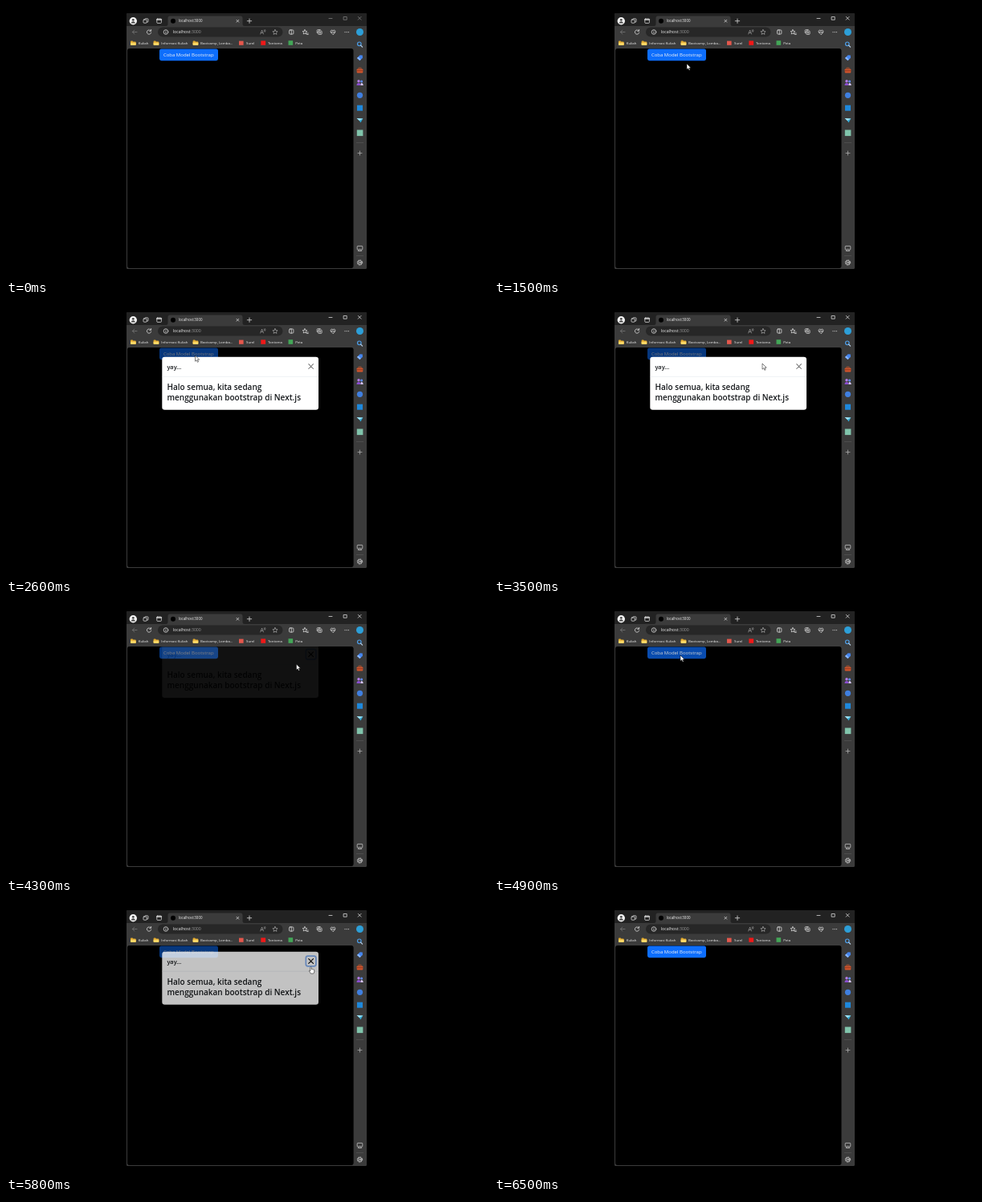
Animation of 600 by 338 pixels, one loop 6.6 s. Source, as an HTML page:

```html
<!DOCTYPE html>
<html lang="id">
<head>
<meta charset="utf-8">
<title>Coba Model Bootstrap</title>
<style>
  html, body { margin: 0; width: 100%; height: 100%; overflow: hidden; background: #000; }
  svg { display: block; width: 100vw; height: 100vh; }
  text { font-family: "Open Sans", "Noto Sans", sans-serif; fill: #f2f2f2; white-space: pre; }
  .line { fill: none; stroke: #d6d6d6; stroke-width: .8; stroke-linecap: round; stroke-linejoin: round; }
  .small { font-size: 4.35px; }
  .dim { stroke: #777; }
  .soft { stroke: #aaa; }
  #modal text { fill: #15181b; font-weight: 600; }
</style>
</head>
<body>
<svg viewBox="0 0 600 338">
  <defs>
    <clipPath id="pageClip"><rect x="151" y="53" width="281.5" height="274" rx="3"/></clipPath>
    <clipPath id="winClip"><rect x="150" y="9" width="299" height="319"/></clipPath>
    <g id="folder">
      <path d="M0 1q0-.9 .9-.9h1.6l1 1h2.4q.8 0 .8 .8v3q0 .8-.8 .8H.9q-.9 0-.9-.9z" fill="#e0a92e"/>
      <path d="M0 2.4h6.7v2.5q0 .8-.8 .8H.9q-.9 0-.9-.9z" fill="#ffd766"/>
    </g>
  </defs>
  <rect width="600" height="338"/>

  <!-- window frame -->
  <rect x="150" y="9" width="299" height="319" rx="1.5" fill="#3b3b3b"/>
  <path d="M150 25V10.5q0-1.5 1.5-1.5h296q1.5 0 1.5 1.5V25z" fill="#222"/>
  <path d="M199 25q2.5 0 2.5-2.5V15q0-2.5 2.5-2.5h88q2.5 0 2.5 2.5v7.500q0 2.500 2.500 2.500z" fill="#3b3b3b"/>

  <!-- title bar -->
  <circle cx="158.300" cy="18.700" r="4.700" fill="#f4f4f4"/>
  <circle cx="158.300" cy="17.300" r="1.400" fill="#444"/>
  <path d="M155.700 21.500q.3-2.300 2.600-2.300t2.600 2.300z" fill="#444"/>
  <g class="line">
    <rect x="171" y="17" width="4.200" height="4.200" rx=".8"/>
    <path d="M172.700 17v-.4q0-.8 .8-.8h2.700q.8 0 .8 .8v2.700q0 .8-.8 .8h-.8"/>
    <rect x="187.800" y="16" width="5.600" height="5.400" rx=".8"/>
    <path d="M187.800 17h5.600" stroke-width="1.600"/>
    <path d="M287 17.300l2.800 2.800m0-2.800l-2.800 2.800M303 16v5.400m-2.700-2.700h5.400"/>
  </g>
  <circle cx="208" cy="18.700" r="3" fill="#000"/>
  <text x="214.800" y="20.300" font-size="4.400">localhost:3000</text>
  <g id="controls" class="line" stroke-linecap="butt">
    <path d="M402 15.500h4"/>
    <rect x="420.500" y="13.500" width="3.700" height="3.700"/>
    <path d="M438.300 13.400l3.800 3.800m0-3.800l-3.800 3.800"/>
  </g>

  <!-- toolbar -->
  <rect x="189" y="26.500" width="155.500" height="12" rx="6" fill="#272727"/>
  <path class="line dim" d="M163 32.500h-5.600m2.400-2.400l-2.400 2.400l2.400 2.400"/>
  <g class="line">
    <path d="M180.300 31a2.700 2.700 0 1 0 .4 2.300M180.600 29.400v1.900h-1.900"/>
    <circle cx="199" cy="32.500" r="2.800"/>
    <path d="M199 32.300v1.600M199 31v.05"/>
    <rect x="352.500" y="30" width="5.400" height="5" rx=".9"/>
    <path d="M355.200 29.500v6"/>
    <path d="M372 29.600l.8 1.800l2 .2l-1.500 1.400l.4 2l-1.700-1l-1.800 1l.4-2l-1.500-1.400l2-.2zM374.600 34h1.600m-1.600 1.500h1.600"/>
    <rect x="388.500" y="31" width="4.600" height="4.400" rx=".9"/>
    <path d="M387.200 33.600v-3q0-1 1-1h3M390.800 32.200v2m-1-1h2"/>
    <path d="M407 35.500l-2.500-2.500q-1-1.500 .2-2.600q1.300-.9 2.300 .4q1-1.300 2.300-.4q1.200 1.100 .2 2.600zM404.500 32.800h1.600l.8-1l.8 1.600l.5-.6h1.400"/>
    <path d="M422 32.600h.05m2.150 0h.05m2.150 0h.05" stroke-width="1.100"/>
  </g>
  <g class="line soft">
    <path d="M335 29.500l.95 2l2.150 .25l-1.600 1.500l.45 2.150l-1.950-1.100l-1.950 1.100l.45-2.150l-1.600-1.500l2.150-.25z" stroke-width=".7"/>
    <path d="M316.700 35l1.900-5l1.900 5m-3.200-1.600h2.600M321.300 30q.9 .8 0 1.700M322.400 29.400q1.500 1.400 0 3" stroke-width=".6"/>
  </g>
  <text x="207.800" y="34.400" font-size="5.200">localhost<tspan fill="#9a9a9a">:3000</tspan></text>
  <circle cx="440.500" cy="32.500" r="4.500" fill="#2d9fd8"/>

  <!-- bookmarks -->
  <use href="#folder" x="155" y="43.300"/>
  <use href="#folder" x="183.600" y="43.300"/>
  <use href="#folder" x="232.600" y="43.300"/>
  <rect x="290" y="43.600" width="5.600" height="5.200" fill="#e4574c"/>
  <rect x="317.300" y="43.400" width="5.800" height="5.400" fill="#f01818"/>
  <rect x="351.500" y="43.200" width="5.600" height="5.600" fill="#43a657"/>
  <g id="bookmarks"></g>

  <!-- sidebar -->
  <g>
    <circle cx="439.800" cy="47.300" r="2.300" fill="none" stroke="#4d9de6" stroke-width="1.200"/>
    <path d="M441.600 49.200l2 2" stroke="#bcd6ee" stroke-width="1.200" stroke-linecap="round"/>
    <path d="M437 65l3.600-3.700l3.200 .2l.2 3.200l-3.600 3.300z" fill="#4586ef"/>
    <path d="M437 65l1.500-1.500l3.300 3.200l-1.400 1.300z" fill="#8dbaff"/>
    <path d="M438.900 78.500v-1.300h3.200v1.300" fill="none" stroke="#c0562b" stroke-width=".8"/>
    <rect x="436.700" y="78.400" width="7.600" height="5" rx=".9" fill="#d4552b"/>
    <path d="M436.700 80.800h7.600" stroke="#7d3320" stroke-width=".9"/>
    <circle cx="439" cy="93.800" r="1.700" fill="#b47bea"/>
    <circle cx="442.600" cy="94" r="1.500" fill="#5f8df2"/>
    <path d="M436.500 99q0-3 2.500-3t2.500 3z" fill="#8b4fd1"/>
    <path d="M441.500 99q-.2-3 1.300-3t2 3z" fill="#d9c9f4"/>
    <circle cx="440.500" cy="111.300" r="3.600" fill="#3f7fe0"/>
    <rect x="437" y="123.700" width="7" height="7" fill="#1e88dc"/>
    <path d="M436.600 139.900l7.800 .5l-3 5.200l-1.600-2.600z" fill="#32a9d6"/>
    <path d="M436.600 139.900l7.800 .5l-4.600 2.600z" fill="#a5e4f2"/>
    <rect x="436.800" y="154.500" width="7.600" height="7.600" fill="#80c4ab"/>
    <path d="M436 170.500h9M436 311.500h9" stroke="#595959" stroke-width=".6"/>
    <g class="line">
      <path d="M440.500 181v5m-2.500-2.500h5" stroke="#aaa"/>
      <path d="M439 304h-1q-.8 0-.8-.8v-3q0-.8 .8-.8h5q.8 0 .8 .8v3q0 .8-.8 .8h-1M438.600 305.200l1.900-2.300l1.900 2.300z" stroke-width=".7"/>
      <circle cx="440.500" cy="320" r="2.600"/>
      <circle cx="440.500" cy="320" r="3.200" stroke-dasharray="1.250 1.263" stroke-linecap="butt"/>
      <circle cx="440.500" cy="320" r=".9" stroke-width=".7"/>
    </g>
  </g>

  <!-- page -->
  <rect x="151" y="53" width="281.500" height="274" rx="3"/>
  <g clip-path="url(#pageClip)">
    <rect id="button" x="191" y="53.400" width="73" height="14.800" rx="2.400"/>
    <text x="195.900" y="63.200" font-size="6" fill="#fff">Coba Model Bootstrap</text>
    <rect id="backdrop" x="151" y="53" width="282" height="274" opacity="0"/>
    <g id="modal" opacity="0">
      <rect x="194.300" y="64.800" width="194.700" height="66" rx="3.300" fill="#fff"/>
      <path d="M194.300 89.300h194.700" stroke="#dee2e6" stroke-width=".5"/>
      <text x="200.400" y="79.600" font-size="7.400">yay...</text>
      <rect id="ring" x="373.300" y="70.300" width="12.600" height="12.600" rx="2.600" fill="none" stroke="#86b2f5" stroke-width="1.700"/>
      <path id="cross" d="M376.700 73.700l5.800 5.800m0-5.800l-5.800 5.800" stroke="#000" stroke-width="1.050" stroke-linecap="round"/>
      <text x="200.500" y="106.200" font-size="10">Halo semua, kita sedang</text>
      <text x="200.500" y="118.900" font-size="10">menggunakan bootstrap di Next.js</text>
    </g>
  </g>

  <g clip-path="url(#winClip)">
    <g id="cursor" fill="#fff" stroke="#000" stroke-width=".5" stroke-linejoin="round">
      <path id="arrow" d="M0 0v7.200l1.700-1.500l1.200 2.600l1.200-.6l-1.200-2.500h2.300z"/>
      <path id="hand" d="M-.7 .6q.7-1.200 1.400 0v2.600q.7-.5 1.300 .1q.7-.4 1.200 .2q.8-.2 1 .6v2.300q-.2 1.300-.9 2.100h-3.400q-.9-1.700-2.300-3.200q.3-1.100 1.700 .2z"/>
    </g>
  </g>
</svg>
<script>
const LOOP = 6600, STEP = 100;
const FADE = 150, SLIDE = 300, RISE = 21.4;
const FOCUS_AT = 900;
const visits = [
  { open: 1980, close: 4160 },
  { open: 4860, close: 5764 }
];
// time, x, y of the pointer tip
const path = [
  [1000, 302, 300], [1300, 246, 92], [1400, 241, 74], [1500, 240, 72],
  [1700, 239, 71], [1900, 235.5, 63], [3200, 235.5, 63], [3500, 334, 73],
  [3700, 376, 75], [3900, 379.5, 76.5], [4250, 379.5, 76.5], [4650, 235, 65],
  [4750, 232, 64], [5300, 232, 64], [5600, 378, 79], [5700, 379.5, 79.5],
  [6000, 379.5, 79.5], [6400, 452, 118]
];
const marks = [
  [164.8, "Kuliah"], [193.2, "Informasi Kuliah"], [241.9, "Bootcamp, Lomba..."],
  [299, "Surel"], [326, "Tontoma"], [360.2, "Peta"]
];

const $ = id => document.getElementById(id);
const set = (id, attrs) => {
  for (const key in attrs) $(id).setAttribute(key, attrs[key]);
};
const clamp = v => Math.min(1, Math.max(0, v));

$("bookmarks").innerHTML = marks
  .map(([x, label]) => `<text class="small" x="${x}" y="47.900">${label}</text>`).join("");

// cubic-bezier(0, 0, .58, 1)
function easeOut(x) {
  let lo = 0, hi = 1;
  for (let i = 0; i < 24; i++) {
    const s = (lo + hi) / 2;
    if (1.74 * (1 - s) * s * s + s ** 3 < x) lo = s; else hi = s;
  }
  return 3 * (1 - lo) * lo * lo + lo ** 3;
}

function pointer(t) {
  const i = path.findIndex(p => p[0] > t);
  if (i < 1) return null;
  const [t0, x0, y0] = path[i - 1], [t1, x1, y1] = path[i];
  const k = (t - t0) / (t1 - t0);
  return [x0 + (x1 - x0) * k, y0 + (y1 - y0) * k];
}

// The backdrop fades in before the dialog and out after it.
function dialog(t) {
  const state = { shade: 0, alpha: 0, y: -RISE, focus: false, pressed: false };
  for (const { open, close } of visits) {
    if (t > open - 80 && t < open + 120) state.pressed = true;
    if (t < open || t > close + 2 * FADE) continue;
    const shown = t - open - FADE, gone = t - close;
    state.shade = .5 * Math.min(clamp((t - open) / FADE), 1 - clamp((gone - FADE) / FADE));
    state.alpha = Math.min(clamp(shown / FADE), 1 - clamp(gone / FADE));
    const slide = gone > 0 ? 1 - easeOut(clamp(gone / SLIDE)) : easeOut(clamp(shown / SLIDE));
    state.y = -RISE * (1 - slide);
    state.focus = gone > -60;
  }
  return state;
}

function draw(t) {
  const d = dialog(t), tip = pointer(t);
  const inside = (x, y, w, h) =>
    tip && tip[0] >= x && tip[0] <= x + w && tip[1] >= y && tip[1] <= y + h;
  const onButton = d.shade === 0 && inside(191, 53, 73, 15);
  const onCross = d.alpha > 0 && inside(373, 70, 13, 13);

  set("controls", { opacity: t < FOCUS_AT ? .5 : 1 });
  set("button", { fill: d.pressed ? "#0a58ca" : onButton ? "#0b5ed7" : "#0d6efd" });
  set("backdrop", { opacity: d.shade });
  set("modal", { opacity: d.alpha, transform: `translate(0 ${d.y})` });
  set("ring", { opacity: d.focus ? 1 : 0 });
  set("cross", { opacity: d.focus ? 1 : onCross ? .75 : .55 });

  set("cursor", { visibility: tip ? "visible" : "hidden" });
  if (!tip) return;
  const hand = onButton || onCross;
  set("cursor", { transform: `translate(${tip})` });
  set("arrow", { display: hand ? "none" : "inline" });
  set("hand", { display: hand ? "inline" : "none" });
}

const start = performance.now();
function tick() {
  const t = (performance.now() - start) % LOOP;
  draw(Math.floor(t / STEP) * STEP);
  requestAnimationFrame(tick);
}
tick();
</script>
</body>
</html>
```
